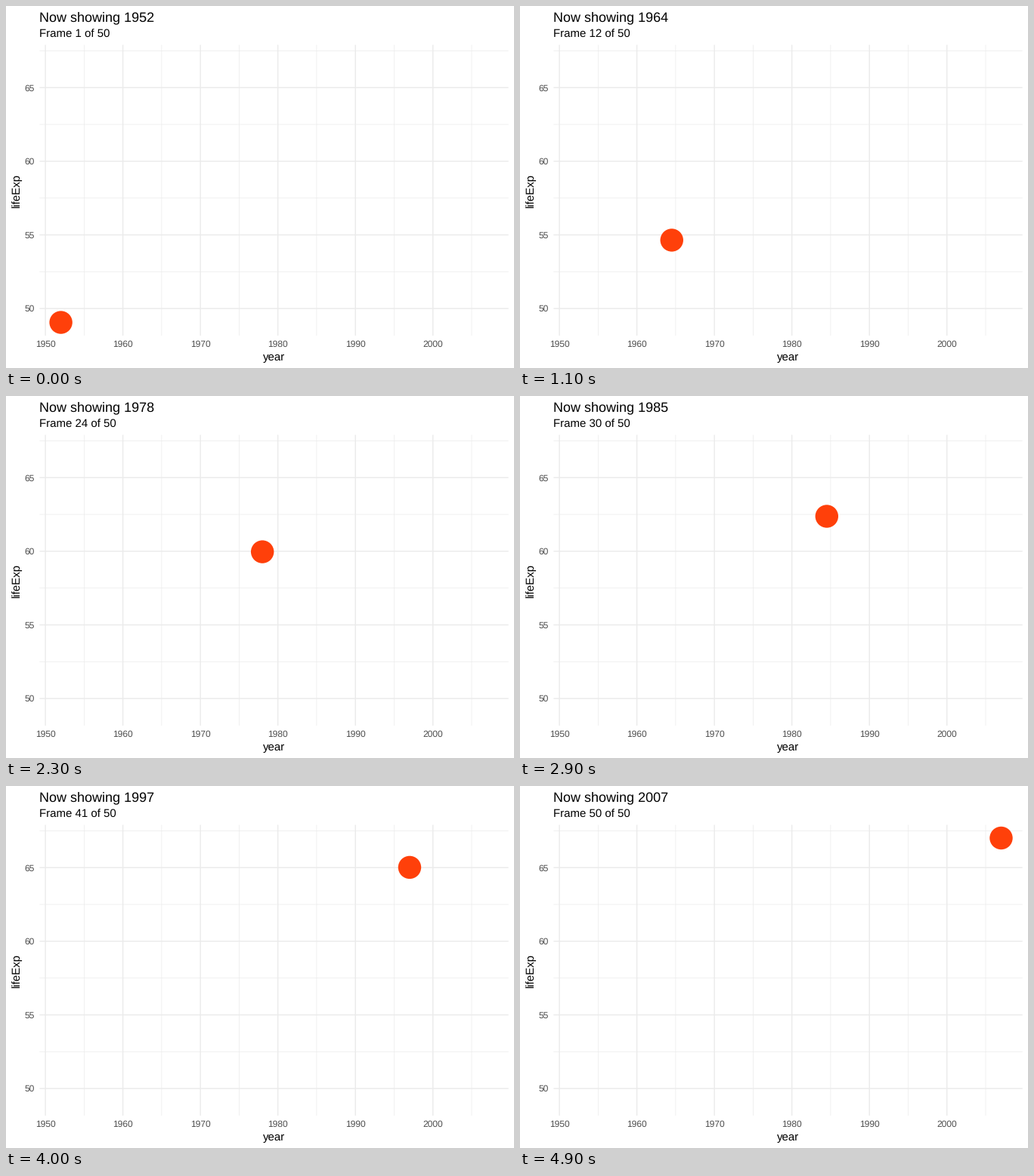
A matplotlib script for the animation above (5000 ms loop, 672x480 px).

```python
import numpy as np
import matplotlib.pyplot as plt
from matplotlib.animation import FuncAnimation
from matplotlib.patches import Circle

WIDTH, HEIGHT, DPI = 672, 480, 96
FRAMES, INTERVAL = 50, 100
PT = 72 / DPI  # points per pixel

plt.rcParams["font.family"] = "Liberation Sans"
plt.rcParams["text.hinting"] = "none"
plt.rcParams["text.hinting_factor"] = 1

YEARS = np.arange(1952, 2008, 5)
LIFE_EXP = [49.0576, 51.5074, 53.6092, 55.6783, 57.6474, 59.5702,
            61.5332, 63.2126, 64.1603, 65.0147, 65.6949, 67.0074]
# Each observation lands on a whole frame; values are interpolated between.
KEY_FRAMES = np.round((YEARS - YEARS[0]) * (FRAMES - 1) / 55)

LEFT, RIGHT, TOP, BOTTOM = 44.4, 664.67, 51.5, 437.1


def px(year):
    return 52.1 + (year - 1950) * 10.2524


def py(value):
    return 401.15 - (value - 50) * 19.53


fig = plt.figure(figsize=(WIDTH / DPI, HEIGHT / DPI), dpi=DPI, facecolor="white")
ax = fig.add_axes([0, 0, 1, 1])
ax.set_xlim(0, WIDTH)
ax.set_ylim(HEIGHT, 0)
ax.axis("off")


def grid(years, values, width):
    style = dict(colors="#EBEBEB", linewidths=width * PT, snap=False, zorder=1)
    ax.hlines([py(v) for v in values], LEFT, RIGHT, **style)
    ax.vlines([px(y) for y in years], TOP, BOTTOM, **style)


def label(x, baseline, text, size, ha="left", color="black", **kwargs):
    return ax.text(x, baseline, text, fontsize=size, ha=ha, va="baseline",
                   color=color, **kwargs)


major_years = range(1950, 2001, 10)
major_values = range(50, 66, 5)
grid(range(1955, 2006, 10), np.arange(52.5, 68, 5), 0.71)
grid(major_years, major_values, 1.42)

for year in major_years:
    label(px(year), 452, str(year), 8.8, "center", "#4D4D4D")
for value in major_values:
    label(37.8, py(value) + 4.2, str(value), 8.8, "right", "#4D4D4D")

label((LEFT + RIGHT) / 2, 470, "year", 11, "center")
ax.text(18, (TOP + BOTTOM) / 2, "lifeExp", fontsize=11, rotation=90,
        rotation_mode="anchor", ha="center", va="baseline")

title = label(LEFT, 20, "", 13.2)
subtitle = label(LEFT, 42, "", 11)
dot = ax.add_patch(Circle((0, 0), 15.2, facecolor="#FF400A", linewidth=0, zorder=3))


def update(frame):
    year = np.interp(frame, KEY_FRAMES, YEARS)
    value = np.interp(frame, KEY_FRAMES, LIFE_EXP)
    dot.center = px(year), py(value)
    shown = round(1952 + 55 * frame / (FRAMES - 1))
    title.set_text(f"Now showing {shown}")
    subtitle.set_text(f"Frame {frame + 1} of {FRAMES}")
    return dot, title, subtitle


anim = FuncAnimation(fig, update, frames=FRAMES, interval=INTERVAL,
                     repeat=True, repeat_delay=0)
plt.show()
```
